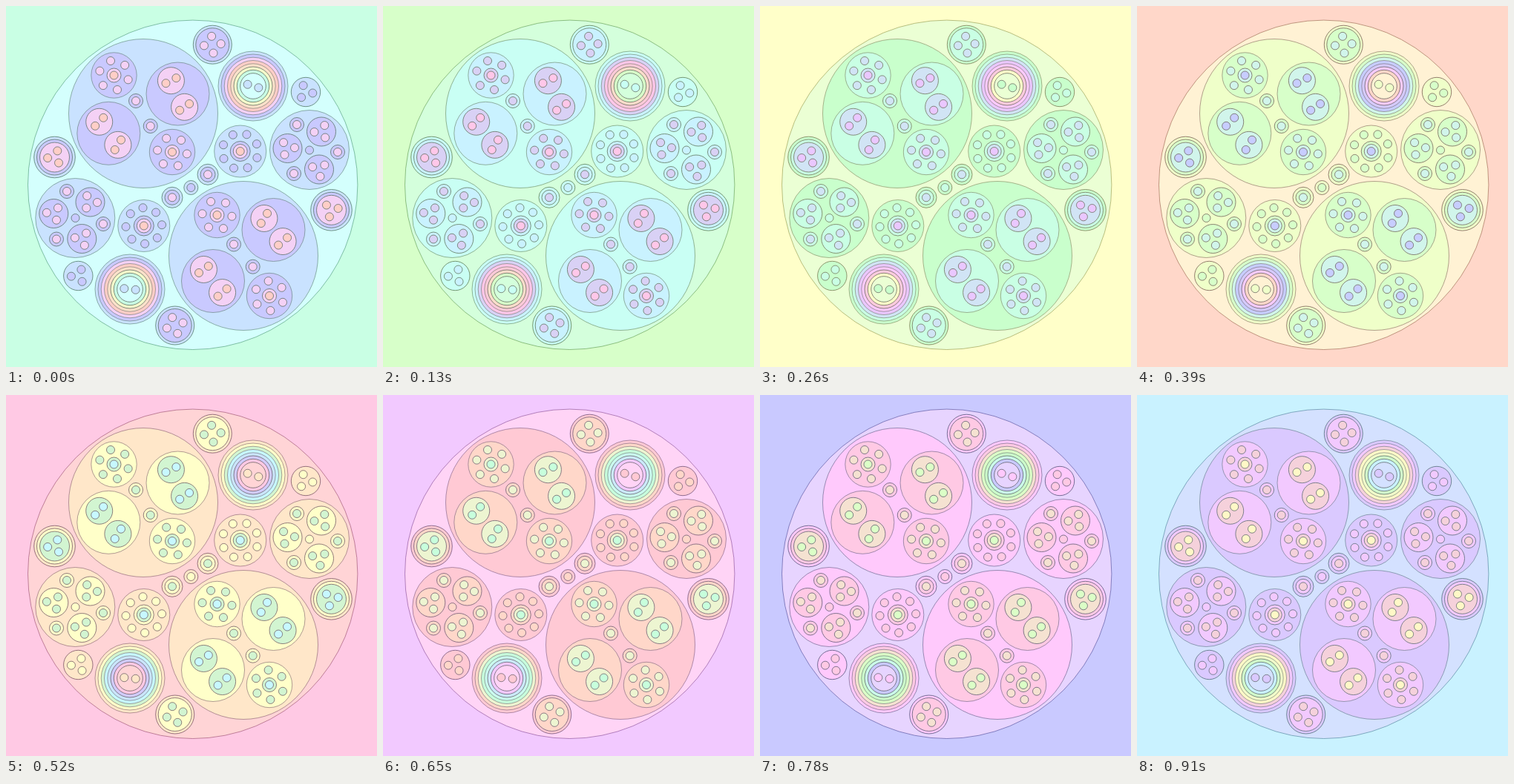
An HTML page with a canvas that plays this animation: 500 px wide and 487 px high, repeating every 1040 ms.

```html
<!DOCTYPE html>
<html lang="en">
<head>
<meta charset="utf-8">
<title>Nested circles</title>
<style>
html, body { margin: 0; width: 100%; height: 100%; overflow: hidden; }
canvas { display: block; }
</style>
</head>
<body>
<canvas id="stage" width="500" height="487"></canvas>
<script>
const ctx = document.getElementById('stage').getContext('2d');
const STEP_MS = 130, STEPS = 8, DOT = 5.5;

// One colour per nesting depth; deeper levels repeat: [hue offset, saturation, lightness]
const PALETTE = [
  [0, 100, 89.5], [27, 100, 91.5], [63, 100, 89.5], [90, 100, 89.5],
  [148, 65, 89], [218, 100, 89], [238, 90, 89], [278, 85, 89]
];
let baseHue = 150;

function color(depth) {
  const [offset, s, l] = PALETTE[depth % PALETTE.length];
  return `hsl(${baseHue + offset} ${s}% ${l}%)`;
}

// Concentric circles, each one level deeper than the last
function rings(x, y, depth, ...radii) {
  radii.forEach((r, i) => {
    ctx.beginPath();
    ctx.arc(x, y, r, 0, Math.PI * 2);
    ctx.fillStyle = color(depth + i);
    ctx.fill();
    // Outlines get greyer with depth and finer with size
    ctx.strokeStyle = `hsl(${baseHue} ${40 / (depth + i)}% 38%)`;
    ctx.lineWidth = r > 30 ? 0.55 : 0.75;
    ctx.stroke();
  });
}

function around(x, y, count, radius, degrees, place) {
  for (let i = 0; i < count; i++) {
    const a = (degrees + i * 360 / count) * Math.PI / 180;
    place(x + radius * Math.cos(a), y + radius * Math.sin(a), i);
  }
}

function dots(x, y, count, radius, degrees, depth) {
  around(x, y, count, radius, degrees, (px, py) => rings(px, py, depth, DOT));
}

function flower(x, y, degrees) {
  rings(x, y, 3, 30.7);
  dots(x, y, 6, 20, degrees, 4);
  rings(x, y, 4, 9.5, DOT);
}

function twins(x, y, degrees, tilts) {
  rings(x, y, 3, 42.5);
  around(x, y, 2, 20, degrees, (px, py, i) => {
    rings(px, py, 4, 18);
    dots(px, py, 2, 7.8, tilts[i], 5);
  });
}

const mini = (x, y) => rings(x, y, 3, 9.5, DOT);

function triplet(x, y, degrees) {
  rings(x, y, 3, 19.5);
  dots(x, y, 3, 9.5, degrees, 4);
}

function wheel(x, y, degrees) {
  rings(x, y, 2, 35);
  dots(x, y, 8, 24.3, degrees, 3);
  rings(x, y, 3, 13.5, 9.5, DOT);
}

function rainbow(x, y, degrees) {
  rings(x, y, 2, 47, 43, 38.8, 34.5, 30.2, 26, 21.7, 17.3);
  dots(x, y, 2, 7.7, degrees, 10);
}

function quad(x, y, degrees) {
  rings(x, y, 2, 26, 22.5);
  dots(x, y, 4, 11.4, degrees, 4);
}

function trio(x, y, degrees) {
  rings(x, y, 2, 19.7);
  dots(x, y, 3, 9.4, degrees, 3);
}

function deepTrio(x, y, degrees) {
  rings(x, y, 2, 27.8, 24, 20);
  dots(x, y, 3, 9.4, degrees, 5);
}

function draw() {
  ctx.fillStyle = color(0);
  ctx.fillRect(0, 0, 500, 487);
  rings(251.7, 241.3, 1, 222.2);

  rings(185, 145, 2, 100.5);
  flower(145.5, 93.5, 17);
  twins(231.5, 118.5, 243, [-27, -34]);
  twins(138.3, 171.8, 231, [-45, -58]);
  flower(224, 197, 7);
  mini(175, 128);
  mini(194.7, 162);

  rings(320, 337, 2, 100.5);
  flower(284.5, 282, 5);
  twins(360.5, 302, 231, [-58, -40]);
  twins(279, 371, 231, [-35, -40]);
  flower(355, 391, 26);
  mini(307, 321.5);
  mini(332.7, 351.7);

  rings(409, 194, 2, 53.5);
  triplet(379.5, 192, -5);
  triplet(425, 169.5, 57);
  triplet(422, 220.5, 81);
  mini(392, 160);
  mini(447, 197);
  mini(388, 226);
  rings(409, 194.5, 3, DOT);

  rings(93.3, 286, 2, 53.5);
  triplet(64.3, 280, 67);
  triplet(113.5, 264.5, 3);
  triplet(102.3, 314, 68);
  mini(82, 250);
  mini(131, 294);
  mini(68, 314.5);
  rings(93.5, 286, 3, DOT);

  wheel(315.7, 196, 21);
  wheel(185.8, 296.5, -3);
  rainbow(333, 108, 17);
  rainbow(167, 382, 6);
  quad(278.3, 52.2, -6);
  quad(227.7, 431, -18);
  trio(404, 116, 9);
  trio(97.3, 364, 56);
  deepTrio(65.5, 204, 54);
  deepTrio(438.5, 275.3, 106);
  rings(272, 227.3, 2, 14, 10, DOT);
  rings(249.3, 245, 2, 9.5, DOT);
  rings(224, 258.3, 2, 14, 10, DOT);
}

let shown = -1;
function tick() {
  const step = Math.floor(performance.now() / STEP_MS) % STEPS;
  if (step !== shown) {
    shown = step;
    baseHue = 150 + 360 - step * 360 / STEPS;
    draw();
  }
  requestAnimationFrame(tick);
}
tick();
</script>
</body>
</html>
```
